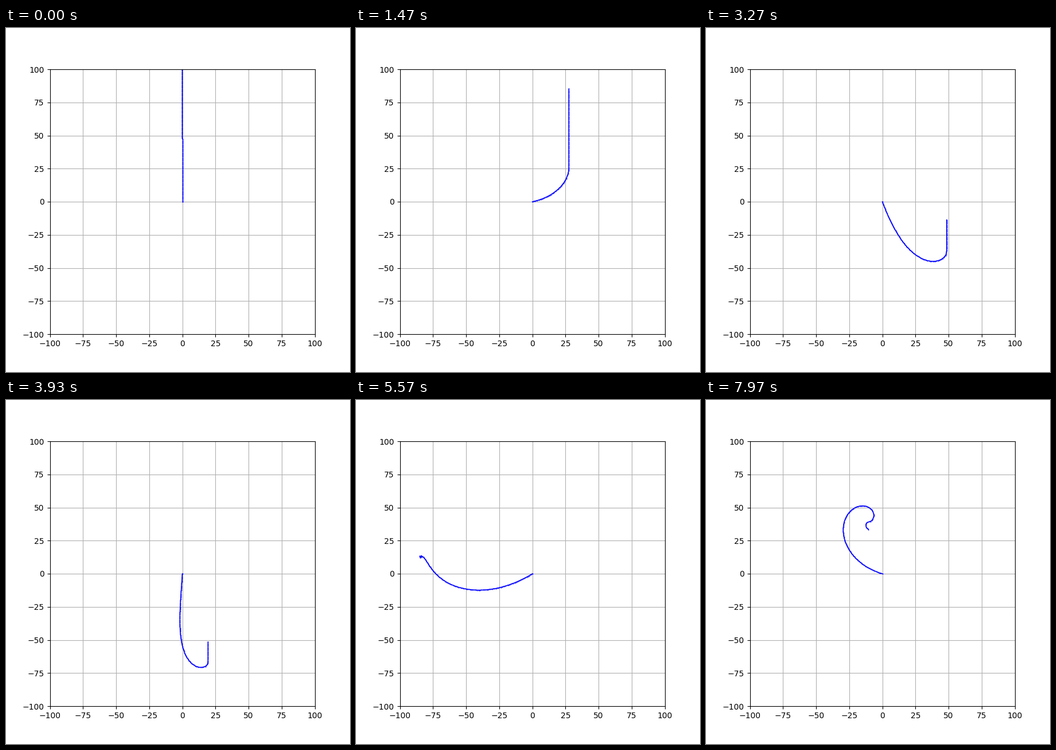
Write a matplotlib script that moves like this. It is 600 px wide and 600 px high and loops after 8000 ms.

```python
import numpy as np
import matplotlib.pyplot as plt
from matplotlib.animation import FuncAnimation

N = 100          # links of unit length and mass
GRAVITY = 9.8
FPS = 30
FRAMES = 240

# Linearised chain pendulum: M th'' + diag(K) th = 0, th measured from "down".
# Link i carries the weight of all links below it.
below = np.arange(N, 0, -1)
mass = np.minimum.outer(below, below)
root = np.sqrt(GRAVITY * below)
inv_sq, modes = np.linalg.eigh(mass / np.outer(root, root))
omega = 1 / np.sqrt(inv_sq)
start = modes.T @ (root * np.pi)      # released at rest, pointing straight up


def rope(t):
    """Joint positions at time t, starting at the pivot."""
    theta = modes @ (np.cos(omega * t) * start) / root
    x = np.append(0, np.cumsum(np.sin(theta)))
    y = np.append(0, np.cumsum(-np.cos(theta)))
    return x, y


fig, ax = plt.subplots(figsize=(6, 6), dpi=100)
ax.set_xlim(-N, N)
ax.set_ylim(-N, N)
ax.set_aspect("equal")
ax.set_xticks(range(-100, 101, 25))
ax.set_yticks(range(-100, 101, 25))
ax.grid(True)
line, = ax.plot([], [], ".-", color="blue", lw=1, ms=1)


def draw(i):
    line.set_data(*rope(i / FPS))
    return line,


anim = FuncAnimation(fig, draw, frames=FRAMES, interval=1000 / FPS,
                     init_func=lambda: draw(0), blit=True, repeat=True)
plt.show()
```
